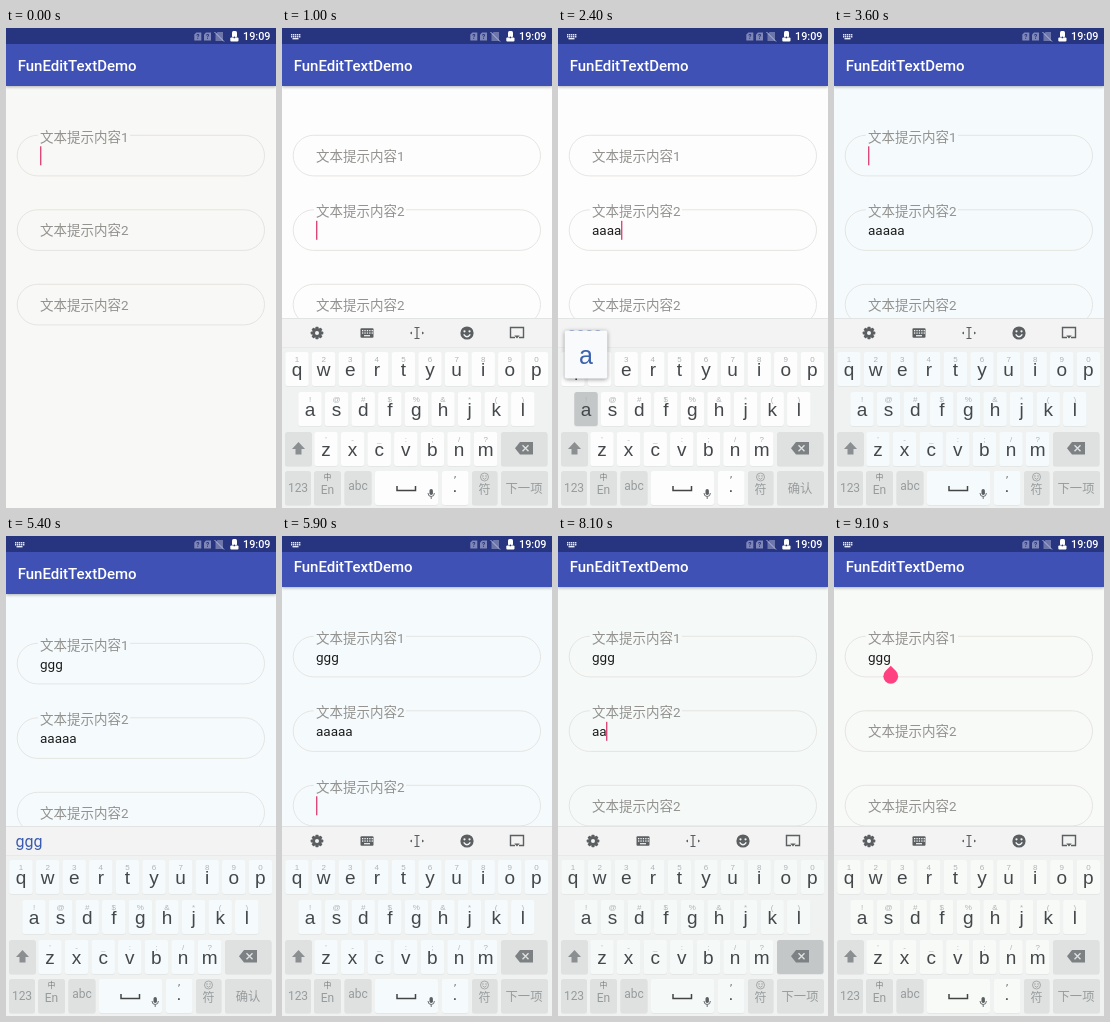
Write an HTML page with a canvas that moves like this. It is 270x480 px and loops after 9.3 s.

```html
<!DOCTYPE html>
<html lang="zh">
<head>
<meta charset="utf-8">
<style>
  html, body { margin: 0; width: 100%; height: 100%; overflow: hidden; }
  canvas { display: block; }
</style>
</head>
<body>
<canvas id="stage" width="270" height="480"></canvas>
<script>
const ctx = document.getElementById('stage').getContext('2d');
const LOOP = 9300, TICK = 100, PAN = 7, KEYBOARD_HEIGHT = 190;
const FONT = 'Roboto, "Noto Sans CJK SC", "Noto Sans CJK", sans-serif';
const KEY_FONT = '"Liberation Sans", Arial, sans-serif';
const PINK = '#ff4081', GREY = '#dfe1e0', INK = '#5b5f61', MUTED = '#979b9c', STATUS = '#27347f';

const A_PRESSES = [1500, 1700, 1900, 2200, 2400];
const G_PRESSES = [4600, 4800, 5000];
const FOCUS = [[0, 0], [300, 1], [3100, 0], [5600, 2], [6600, 1], [8800, 0]];
const PAPER = [[0, '#f8f8f6'], [300, '#fdfdfd'], [3100, '#f5fbfd'], [6600, '#f5faf9'], [8800, '#f8faf8']];
const CARET_OFF = [[2800, 3100], [4100, 4600], [5400, 5600], [7300, 7600], [8600, 8800], [9100, LOOP]];
const KEY_ROWS = [
  { keys: 'qwertyuiop', hints: '1234567890', x: 15, y: 324 },
  { keys: 'asdfghjkl', hints: '!@#$%&*()', x: 28, y: 364 },
  { keys: 'zxcvbnm', hints: "'-_:;/?", x: 44, y: 404 }
];

const clamp = v => Math.max(0, Math.min(1, v));
const within = (t, a, b) => t >= a && t < b;
const latest = (steps, t) => steps.filter(s => t >= s[0]).pop()[1];
const slide = (t, start) => (1 - Math.cos(Math.PI * clamp((t - start + 20) / 300))) / 2;
const typed = (presses, t) => presses.filter(p => t >= p + 100).length;
const pressing = (presses, t) => presses.some(p => within(t, p, p + 100));

function text(str, x, y, size, color, align = 'center', weight = 400, font = FONT) {
  ctx.font = `${weight} ${size}px ${font}`;
  ctx.textAlign = align;
  ctx.fillStyle = color;
  ctx.fillText(str, x, y);
}
function rect(x, y, w, h, color) {
  ctx.fillStyle = color;
  ctx.fillRect(x, y, w, h);
}
function round(x, y, w, h, r, color) {
  ctx.beginPath();
  ctx.roundRect(x, y, w, h, r);
  ctx.fillStyle = color;
  ctx.fill();
}
function disc(x, y, r, color) {
  ctx.beginPath();
  ctx.arc(x, y, r, 0, 2 * Math.PI);
  ctx.fillStyle = color;
  ctx.fill();
}
function stroke(path, color, width = 1) {
  ctx.strokeStyle = color;
  ctx.lineWidth = width;
  ctx.stroke(new Path2D(path));
}
function fill(path, color) {
  ctx.fillStyle = color;
  ctx.fill(new Path2D(path));
}
function shadowed(color, blur, dy, draw) {
  ctx.save();
  ctx.shadowColor = color;
  ctx.shadowBlur = blur;
  ctx.shadowOffsetY = dy;
  draw();
  ctx.restore();
}

function drawStatusBar(keyboardShown) {
  rect(0, 0, 270, 16, STATUS);
  if (keyboardShown) {
    for (let x = 9; x < 18; x += 2) {
      rect(x, 6, 1.4, 1.5, '#e4e7f5');
      rect(x, 8, 1.4, 1.5, '#e4e7f5');
    }
    rect(10.5, 10, 6, 1.4, '#e4e7f5');
  }
  for (const x of [188.3, 198]) {
    fill(`M${x + 2} 4.5h5v8h-7v-6z`, '#7f87b8');
    text('?', x + 3.5, 11, 6.5, STATUS, 'center', 700);
  }
  fill('M211.5 4h5.5v9h-7.5v-6.5z', '#6d76aa');
  stroke('M208.5 4l9.5 9.5', '#b4badb');
  round(226, 3, 5, 6.5, 1.5, '#fff');
  round(224.3, 9.5, 8.2, 4, 1, '#fff');
  disc(228.4, 9.4, 0.9, STATUS);
  text('19:09', 264.4, 12.4, 10.8, '#fff', 'right', 500);
}

function drawField(top, label, value, up, caret, handle) {
  const gap = up > 0.5 ? 92 : 0, middle = 78;
  const baseline = Math.round(top + 25.6);
  ctx.beginPath();
  ctx.moveTo(middle - gap / 2, top);
  ctx.lineTo(31.5, top);
  ctx.arc(31.5, top + 20.3, 20.3, -Math.PI / 2, Math.PI / 2, true);
  ctx.arc(238.2, top + 20.3, 20.3, Math.PI / 2, -Math.PI / 2, true);
  ctx.lineTo(middle + gap / 2, top);
  ctx.strokeStyle = '#e1dfdb';
  ctx.lineWidth = 0.8;
  ctx.stroke();
  text(label, 34, baseline - 19 * up, 13.5, '#93928f', 'left');
  text(value, 34, baseline, 13.5, '#1c1c1c', 'left');
  const end = 34 + ctx.measureText(value).width;
  if (caret) rect(Math.floor(end), top + 11, 1.4, 19, '#de4878');
  if (handle) {
    ctx.save();
    ctx.globalAlpha = handle;
    ctx.translate(end, top + 40);
    ctx.rotate(Math.PI / 4);
    round(-7.4, -7.4, 14.8, 14.8, [0, 7.4, 7.4, 7.4], PINK);
    ctx.restore();
  }
}

function drawPage(t) {
  const focus = latest(FOCUS, t);
  const erased = Math.max(0, Math.min(5, Math.floor((t - 7900) / 100) + 1));
  const caretOn = !CARET_OFF.some(([a, b]) => within(t, a, b));
  const values = ['g'.repeat(typed(G_PRESSES, t)), 'a'.repeat(typed(A_PRESSES, t) - erased), ''];
  const ups = [
    1 - slide(t, 300) + slide(t, 3100),
    slide(t, 300) - slide(t, 8800),
    slide(t, 5600) - slide(t, 6600)
  ];
  const handles = [clamp((t - 8800) / 300), t < 7900 ? clamp((t - 6600) / 300) : 0, 0];
  const labels = ['文本提示内容1', '文本提示内容2', '文本提示内容2'];

  ctx.save();
  ctx.translate(0, -PAN * slide(t, 5600));
  shadowed('rgba(0,0,0,.3)', 3, 1, () => rect(0, 8, 270, 50, '#3f51b5'));
  text('FunEditTextDemo', 11.7, 43, 15, '#fff', 'left', 500);
  labels.forEach((label, i) =>
    drawField(107.3 + 74.5 * i, label, values[i], ups[i], caretOn && focus === i, handles[i]));
  ctx.restore();
}

function drawKey(x, y, w, color) {
  round(x, y + 0.8, w, 34, 2.5, '#e1e4e3');
  round(x, y, w, 34, 2.5, color);
}

function drawSmiley(x, y, r, solid) {
  const line = solid ? '#f2f3f2' : MUTED;
  if (solid) disc(x, y, r, INK);
  else stroke(`M${x - r} ${y}a${r} ${r} 0 1 1 ${2 * r} 0a${r} ${r} 0 1 1 ${-2 * r} 0`, MUTED, 0.8);
  disc(x - r * 0.38, y - r * 0.25, r * 0.17, line);
  disc(x + r * 0.38, y - r * 0.25, r * 0.17, line);
  stroke(`M${x - r * 0.5} ${y + r * 0.2}q${r * 0.5} ${r * 0.75} ${r} 0`, line, solid ? 1.4 : 0.8);
}

function drawToolbar() {
  for (let i = 0; i < 4; i++) {
    ctx.save();
    ctx.translate(35, 305);
    ctx.rotate(i * Math.PI / 4);
    round(-1.6, -6.3, 3.2, 12.6, 0.8, INK);
    ctx.restore();
  }
  disc(35, 305, 4.7, INK);
  disc(35, 305, 2, '#f2f3f2');

  round(78.5, 300.3, 13, 9.5, 1, INK);
  for (let x = 80; x < 91; x += 2.4) {
    rect(x, 302, 1.3, 1.3, '#f2f3f2');
    rect(x, 304.4, 1.3, 1.3, '#f2f3f2');
  }
  rect(82, 307.1, 6, 1.2, '#f2f3f2');

  stroke('M132.5 299.5h5M135 299.5v11M132.5 310.5h5', INK, 1.2);
  fill('M130 303.5v3l-2.2-1.5zM140 303.5v3l2.2-1.5z', INK);
  drawSmiley(185, 305, 6.6, true);
  stroke('M233 309.5h-4.5v-10h13v10h-4.5', INK, 1.4);
  fill('M232.3 307.5h5.4l-2.7 3z', INK);
}

function drawBottomRow(face, composing) {
  const y = 443;
  for (const [x, w, color] of [[3, 26, GREY], [32, 27, GREY], [62.5, 27, GREY], [93, 63, face],
    [160, 26.5, face], [190, 25.5, GREY], [219, 47, GREY]]) drawKey(x, y, w, color);
  text('123', 16, 464, 12, MUTED);
  text('中', 45.5, 452, 7.5, '#777');
  text('En', 45.5, 466, 12, MUTED);
  text('abc', 76, 462, 12, MUTED);
  stroke('M115 458v4.5h18.5v-4.5', '#444', 1.5);
  round(147.5, 461, 3.4, 6, 1.7, INK);
  stroke('M146 465q0 3.5 3.2 3.5t3.2-3.5M149.2 468.5v2.5', INK, 0.9);
  text(',', 173, 449, 11, '#666');
  text('.', 173, 464, 17, '#333');
  drawSmiley(202.5, 449, 4, false);
  text('符', 202.5, 466, 12, MUTED);
  text(composing ? '确认' : '下一项', 242, 464.5, 12.3, MUTED);
}

function drawKeyboard(t, face) {
  const pressed = pressing(A_PRESSES, t) ? 'a' : pressing(G_PRESSES, t) ? 'g' : '';
  const composing = within(t, 1600, 3100) ? 'a'.repeat(typed(A_PRESSES, t))
    : within(t, 4700, 5600) ? 'g'.repeat(typed(G_PRESSES, t)) : '';

  rect(0, 290, 270, KEYBOARD_HEIGHT, '#f0f2f1');
  rect(0, 290, 270, 29.5, '#f2f3f2');
  rect(0, 290, 270, 0.8, '#dfe1e0');
  rect(0, 319, 270, 0.8, '#e6e8e7');
  if (composing) text(composing, 9.5, 310.5, 16, '#3b5cae', 'left');
  else drawToolbar();

  for (const { keys, hints, x, y } of KEY_ROWS) {
    [...keys].forEach((key, i) => {
      const cx = x + 26.6 * i;
      drawKey(cx - 11.7, y, 23.4, key === pressed ? '#c3c7c8' : face);
      text(hints[i], cx, y + 10, 8, '#b0b4b5', 'center', 400, KEY_FONT);
      text(key, cx, y + 24, 19, '#44484b', 'center', 400, KEY_FONT);
    });
  }
  drawKey(3, 404, 27, GREY);
  fill('M16.5 414l6.5 7h-3.5v5.5h-6v-5.5h-3.5z', '#8b8f91');
  drawKey(219, 404, 46.5, within(t, 7900, 8400) ? '#c3c7c8' : GREY);
  fill('M238 414h13v12.5h-13l-5-6.2z', '#7d8183');
  stroke('M240.5 417.3l6 6M246.5 417.3l-6 6', GREY, 1.4);
  drawBottomRow(face, composing);

  if (pressed) {
    const cx = KEY_ROWS[1].x + 26.6 * KEY_ROWS[1].keys.indexOf(pressed);
    shadowed('rgba(0,0,0,.4)', 4, 1, () => round(cx - 21.3, 302.5, 42.6, 48, 2, '#f8fafb'));
    text(pressed, cx, 336, 25, '#3b62ae', 'center', 400, KEY_FONT);
  }
}

function draw(t) {
  const paper = latest(PAPER, t);
  const rise = 1 - (1 - clamp((t - 500) / 400)) ** 2;
  rect(0, 0, 270, 480, paper);
  drawPage(t);
  if (rise) {
    ctx.save();
    ctx.translate(0, KEYBOARD_HEIGHT * (1 - rise));
    drawKeyboard(t, paper);
    ctx.restore();
  }
  drawStatusBar(rise > 0);
}

function loop() {
  const t = performance.now() % LOOP;
  draw(Math.floor(t / TICK) * TICK);
  requestAnimationFrame(loop);
}
loop();
</script>
</body>
</html>
```
